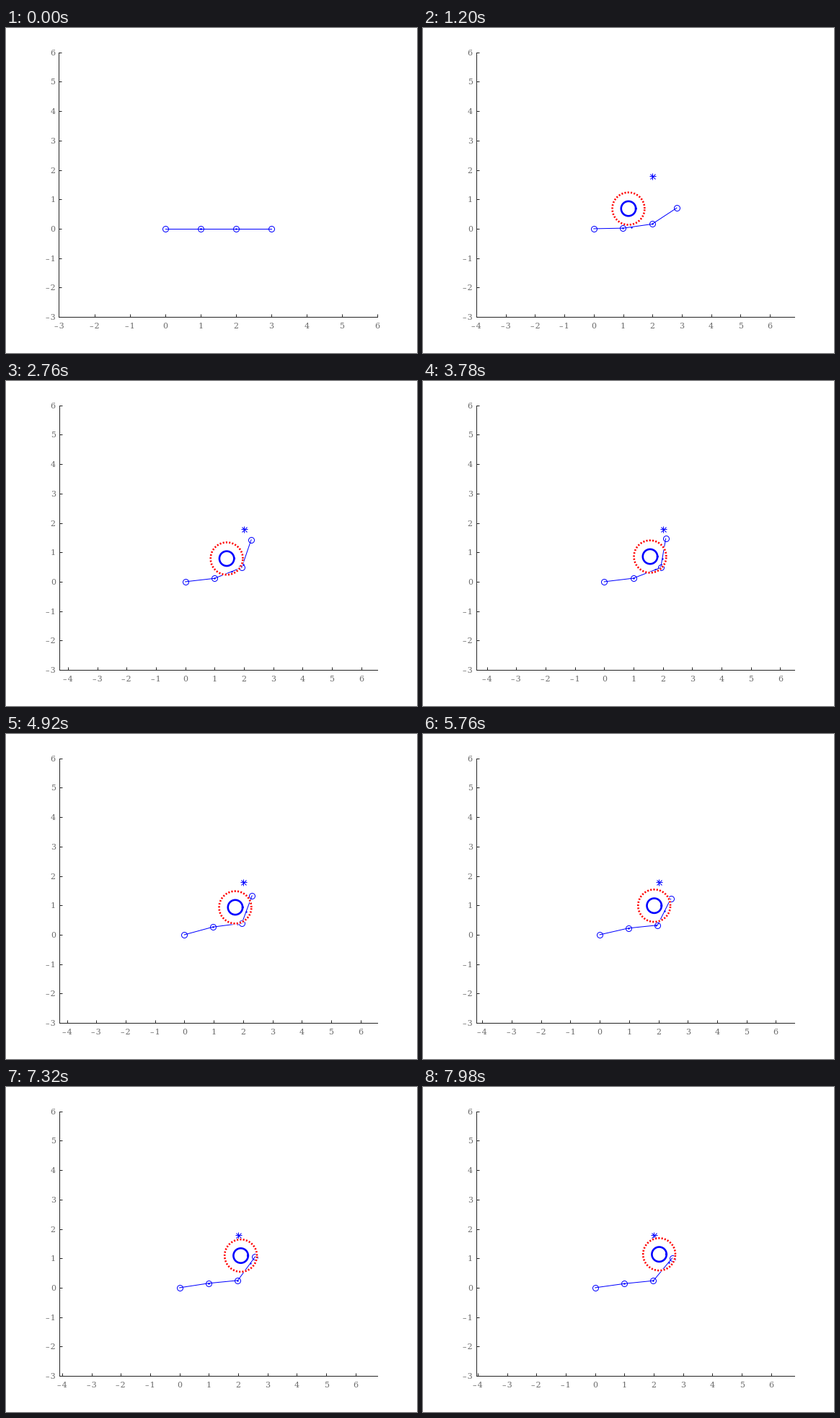
A matplotlib script that plays this animation: 570x450 px, repeating every 8000 ms.

```python
import numpy as np
import matplotlib.pyplot as plt
from matplotlib.animation import FuncAnimation
from matplotlib.ticker import FixedLocator, FuncFormatter

W, H = 570, 450
PX = 0.72                      # points per pixel at 100 dpi
TICK_MS, STEP_MS, LOOP_MS = 20, 60, 8000
GOAL = (2, 1.8)
R_BODY, R_SAFE = 0.25, 0.55
HALF_WIDTH = 5.42              # half of the x range once scales are equal

# Link headings in degrees at a few steps
KNOTS = np.array([0, 20, 46, 63, 82, 110, 133], float)
HEADINGS = np.array([
    [0, 1.1, 6.5, 6.8, 15.2, 9.7, 7.9],
    [0, 8.0, 21.6, 21.2, 7.3, 5.4, 5.8],
    [0, 33.2, 71.1, 80.1, 69.7, 57.8, 50.2],
])


def slopes(v):
    """Tangents that keep the curve monotone between knots."""
    d = np.diff(v) / np.diff(KNOTS)
    m = np.zeros(len(v))
    m[0], m[-1] = d[0], d[-1]
    for i in range(1, len(d)):
        if d[i - 1] * d[i] > 0:
            m[i] = 2 * d[i - 1] * d[i] / (d[i - 1] + d[i])
    return m


def hermite(v, m, k):
    i = min(np.searchsorted(KNOTS, k, side="right") - 1, len(KNOTS) - 2)
    h = KNOTS[i + 1] - KNOTS[i]
    s = (k - KNOTS[i]) / h
    return (v[i] * (1 + 2 * s) * (1 - s) ** 2 + m[i] * h * s * (1 - s) ** 2
            + v[i + 1] * s * s * (3 - 2 * s) + m[i + 1] * h * s * s * (s - 1))


SLOPES = [slopes(v) for v in HEADINGS]


def arm(k):
    a = np.radians([hermite(v, m, k) for v, m in zip(HEADINGS, SLOPES)])
    links = np.column_stack([np.cos(a), np.sin(a)])
    return np.vstack([[0, 0], np.cumsum(links, axis=0)])


def obstacle(k):
    return np.array([1.006 + 0.00886 * k, 0.604 + 0.004 * k])


def nearest_points(joints, c):
    """Closest point to c on every unit-length link."""
    d = np.diff(joints, axis=0)
    s = np.clip(np.sum((c - joints[:-1]) * d, axis=1), 0, 1)
    return joints[:-1] + s[:, None] * d


plt.rcParams["font.family"] = "DejaVu Serif"
fig = plt.figure(figsize=(W / 100, H / 100), dpi=100, facecolor="white")
ax = fig.add_axes([73.45 / W, 50 / H, 441.75 / W, 366.25 / H])
ax.set_ylim(-3, 6)
for side in ("top", "right"):
    ax.spines[side].set_visible(False)
for side in ("left", "bottom"):
    ax.spines[side].set(linewidth=PX, color="0.15")
ax.tick_params(direction="in", length=4.4 * PX, width=PX, color="0.15",
               labelcolor="0.42", labelsize=7.9)
ax.tick_params(axis="x", pad=5.6)
ax.tick_params(axis="y", pad=3.6)
label = FuncFormatter(lambda v, _: f"{v:.0f}".replace("-", "\u2013\u200a"))
for axis in (ax.xaxis, ax.yaxis):
    axis.set_major_locator(FixedLocator(range(-4, 7)))
    axis.set_major_formatter(label)

turn = np.linspace(0, 2 * np.pi, 121)
circle = np.array([np.cos(turn), np.sin(turn)])


def curve(color, width, **kw):
    return ax.plot([], [], color=color, lw=width * PX, clip_on=False, **kw)[0]


links = curve("blue", 1, marker="o", ms=8 * PX, mfc="none", mew=PX)
dots = curve("blue", 0, marker="o", ms=2.4 * PX, mew=0)
star_plus = curve("blue", 0, marker="+", ms=9 * PX, mew=PX)
star_cross = curve("blue", 0, marker="x", ms=7 * PX, mew=PX)
gap_ring = curve("white", 3)
dot_ring = curve("red", 2.6, dashes=(0.8, 0.85), dash_capstyle="butt")
body = curve("blue", 2.6)
scene = [star_plus, star_cross, gap_ring, dot_ring, body]


def draw(i):
    k = i * TICK_MS // STEP_MS
    joints, c = arm(k), obstacle(k)
    links.set_data(*joints.T)
    dots.set_data(*nearest_points(joints, c).T)
    for star in (star_plus, star_cross):
        star.set_data([GOAL[0]], [GOAL[1]])
    for ring, r in ((gap_ring, R_SAFE), (dot_ring, R_SAFE), (body, R_BODY)):
        ring.set_data(*(c[:, None] + r * circle))
    for item in scene:
        item.set_visible(k > 0)
    if k == 0:
        ax.set_aspect("auto")
        ax.set_xlim(-3, 6)
    else:
        mid = max(joints[:, 0].max(), c[0] + R_SAFE) / 2
        ax.set_aspect("equal", adjustable="box")
        ax.set_xlim(mid - HALF_WIDTH, mid + HALF_WIDTH)
    return [links, dots, *scene]


anim = FuncAnimation(fig, draw, frames=LOOP_MS // TICK_MS, interval=TICK_MS,
                     init_func=lambda: draw(0), repeat=True, repeat_delay=0,
                     blit=False, cache_frame_data=False)
plt.show()
```
